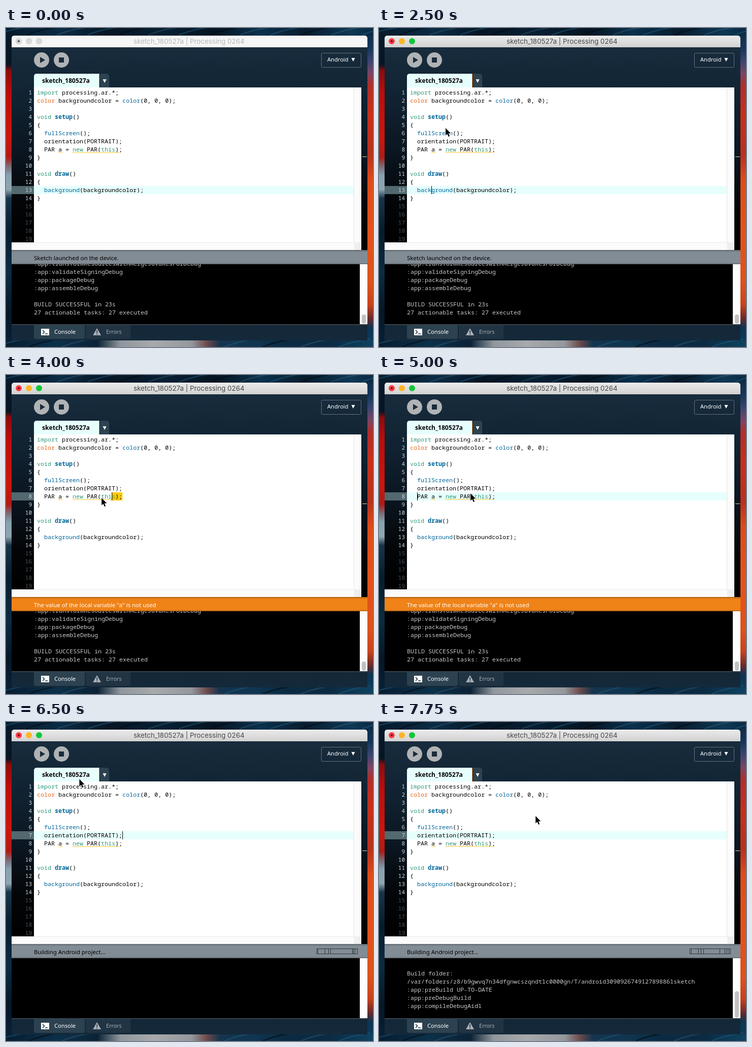
Animation, 722 px wide and 628 px high, one loop 8000 ms. Source, as an HTML page with a canvas:

```html
<!DOCTYPE html>
<html lang="en">
<head>
<meta charset="utf-8">
<title>Sketch editor</title>
<style>
html, body { margin: 0; width: 100%; height: 100%; overflow: hidden; background: #061725; }
canvas { display: block; }
</style>
</head>
<body>
<canvas id="stage" width="722" height="628"></canvas>
<script>
const ctx = document.getElementById('stage').getContext('2d');
const STEP = 250, LOOP = 8000;
const MONO = '"Noto Sans Mono", "DejaVu Sans Mono", monospace';
const SANS = '"Noto Sans", "Open Sans", sans-serif';
const COL = 7, ROW = 16, CODE_X = 61;
const GREEN = '#33997e', BLUE = '#006699', ORANGE = '#e2661a', AQUA = '#e6fffd';

// Each line is a list of [column, text, colour, bold].
const code = [
  [[0, 'import', GREEN], [7, 'processing.ar.*;']],
  [[0, 'color', ORANGE], [6, 'backgroundcolor ='], [24, 'color', BLUE], [29, '(0, 0, 0);']],
  [],
  [[0, 'void', GREEN], [5, 'setup', BLUE, true], [10, '()']],
  [[0, '{']],
  [[2, 'fullScreen', BLUE], [12, '();']],
  [[2, 'orientation(PORTRAIT);']],
  [[2, 'PAR a ='], [10, 'new', GREEN], [14, 'PAR('], [18, 'this', GREEN], [22, ');']],
  [[0, '}']],
  [],
  [[0, 'void', GREEN], [5, 'draw', BLUE, true], [9, '()']],
  [[0, '{']],
  [[2, 'background', BLUE], [12, '(backgroundcolor);']],
  [[0, '}']]
];

const oldLog = [':app:transformResourcesWithMergeJavaResForDebug', ':app:validateSigningDebug',
  ':app:packageDebug', ':app:assembleDebug', '', 'BUILD SUCCESSFUL in 23s',
  '27 actionable tasks: 27 executed'];
const newLog = ['Build folder:',
  '/var/folders/z8/b9gwvq7n34dfgnwcszqndtlc0000gn/T/android3090926749127898861sketch',
  ':app:preBuild UP-TO-DATE', ':app:preDebugBuild', ':app:compileDebugAidl'];

// Pointer stops: [time, x, y].
const route = [[1250, 112, 330], [1500, 103, 316], [2250, 103, 316], [2500, 130, 196],
  [2750, 70, 175], [3000, 150, 200], [3250, 240, 226], [3500, 280, 238], [3750, 230, 237],
  [4000, 187, 241], [4250, 75, 240], [4500, 110, 238], [5000, 179, 232], [5250, 236, 218],
  [6000, 65, 76], [6250, 65, 76], [7000, 300, 182], [7250, 307, 184]];

function pointerAt(t) {
  if (t < route[0][0]) return null;
  const i = route.findIndex(p => p[0] > t);
  if (i < 0) return route[route.length - 1].slice(1);
  const [t0, x0, y0] = route[i - 1], [t1, x1, y1] = route[i];
  const k = (t - t0) / (t1 - t0);
  return [x0 + (x1 - x0) * k, y0 + (y1 - y0) * k];
}

function rect(x, y, w, h, fill) {
  ctx.fillStyle = fill;
  ctx.fillRect(x, y, w, h);
}

function round(x, y, w, h, radii, fill) {
  ctx.beginPath();
  ctx.roundRect(x, y, w, h, radii);
  ctx.fillStyle = fill;
  ctx.fill();
}

function disc(x, y, r, fill) {
  ctx.beginPath();
  ctx.arc(x, y, r, 0, Math.PI * 2);
  ctx.fillStyle = fill;
  ctx.fill();
}

function poly(points, fill) {
  ctx.beginPath();
  points.forEach(p => ctx.lineTo(p[0], p[1]));
  ctx.closePath();
  ctx.fillStyle = fill;
  ctx.fill();
}

function text(str, x, y, fill, font, align = 'left') {
  ctx.font = font;
  ctx.textAlign = align;
  ctx.fillStyle = fill;
  ctx.fillText(str, x, y);
}

function mono(str, x, y, fill, bold) {
  text(str, x, y, fill, (bold ? 'bold ' : '') + '11.667px ' + MONO);
}

// Stops alternate position (pixels along the axis) and colour.
function ramp(x0, y0, x1, y1, ...stops) {
  const g = ctx.createLinearGradient(x0, y0, x1, y1);
  const len = Math.hypot(x1 - x0, y1 - y0);
  for (let i = 0; i < stops.length; i += 2) g.addColorStop(stops[i] / len, stops[i + 1]);
  return g;
}

// Slanted brush strokes spread evenly from (x, y).
function strokes(count, x, y, dx, dy, colors) {
  ctx.lineWidth = 2.5;
  for (let i = 0; i < count; i++) {
    ctx.strokeStyle = colors[i % colors.length];
    ctx.beginPath();
    ctx.moveTo(x + i * dx, y + i * dy + 14);
    ctx.quadraticCurveTo(x + i * dx + 22, y + i * dy + 4, x + i * dx + 62, y + i * dy - 2);
    ctx.stroke();
  }
}

function wallpaper() {
  rect(0, 0, 722, 628, '#061725');
  rect(0, 0, 11, 628, ramp(0, 0, 0, 628, 0, '#061a2b', 72, '#071522', 84, '#8d0c0c',
    130, '#bd0d0a', 215, '#cb170b', 255, '#b01b14', 272, '#7c6a76', 290, '#86a2b1',
    318, '#8fa5b0', 335, '#17354a', 400, '#071c2c', 480, '#0b2c43', 560, '#061726', 628, '#08213a'));
  rect(711, 0, 11, 628, ramp(711, 0, 711, 628, 0, '#0b2b45', 40, '#16365a', 65, '#3b4670',
    90, '#7c4564', 112, '#b02e2a', 170, '#c92f19', 250, '#b8321c', 300, '#df4c1a',
    400, '#e4521a', 500, '#de521c', 545, '#c8421c', 572, '#6a2a2a', 590, '#0c3553', 628, '#0d3d5c'));
  rect(0, 0, 722, 15, ramp(0, 0, 722, 0, 0, '#06192a', 110, '#0a2c45', 200, '#061523',
    310, '#071f33', 410, '#051421', 500, '#0a314c', 590, '#071c2e', 680, '#0d3855', 722, '#0a2a42'));
  rect(0, 615, 722, 13, ramp(0, 0, 722, 0, 0, '#071d30', 100, '#0b304a', 180, '#0b2235',
    225, '#8f979d', 290, '#a8a9ab', 365, '#94989d', 395, '#6d4a4c', 420, '#15344d',
    490, '#0f3550', 550, '#0a2a42', 640, '#0b2b43', 722, '#0e4362'));
  const blues = ['rgba(32,92,128,.5)', 'rgba(2,10,18,.6)', 'rgba(90,130,155,.25)'];
  strokes(13, -20, 0, 60, 0, blues);
  strokes(4, 430, 614, 75, 0, blues);
  strokes(3, -20, 614, 65, 0, blues);
}

function titleBar(active) {
  round(11, 15, 700, 23, [5, 5, 0, 0],
    active ? ramp(0, 15, 0, 37, 0, '#ebebeb', 22, '#d3d3d3') : '#f6f6f6');
  const lights = active ? ['#fc3b45', '#fdb525', '#12c639'] : ['#d9d9d9', '#d9d9d9', '#d9d9d9'];
  lights.forEach((c, i) => {
    disc(25 + i * 20, 26, 6, active ? c : '#c6c6c6');
    if (!active) disc(25 + i * 20, 26, 5.2, c);
  });
  disc(25, 26, 2, active ? '#6b0609' : '#4a4a4a');
  text('sketch_180527a | Processing 0264', 360, 31, active ? '#484848' : '#b7b7b7',
    '13.35px Inter, "Liberation Sans", sans-serif', 'center');
}

function arrowDown(x, y) {
  poly([[x - 3.5, y - 3], [x + 3.5, y - 3], [x, y + 4]], '#fff');
}

function toolbar(t) {
  disc(70, 63, 15, t === 6250 ? '#fff' : '#b0b3b5');
  poly([[67, 57], [67, 69], [77, 63]], '#1a2b39');
  disc(109, 63, 15, '#b0b3b5');
  rect(104, 58, 10, 10, '#1a2b39');
  if (t >= 5750 && t <= 6250) text('Run on device', 133, 67, '#f2f5f6', '10.9px ' + SANS);

  ctx.strokeStyle = '#62717d';
  ctx.lineWidth = 1;
  ctx.beginPath();
  ctx.roundRect(620.5, 49.5, 78, 28, 2);
  ctx.stroke();
  text('Android', 632, 66, '#fff', '11.1px ' + SANS);
  arrowDown(683, 62);

  round(55, 90, 128, 27, [5, 0, 0, 0], AQUA);
  rect(183, 90, 1, 27, '#d8701f');
  text('sketch_180527a', 71, 108, '#000', 'bold 12.1px ' + SANS);
  round(185, 90, 18, 27, [0, 5, 0, 0], '#2d4250');
  arrowDown(194, 104);
}

function squiggle(x0, x1, y) {
  for (let x = x0; x < x1; x += 2) rect(x, y + (x - x0) / 2 % 2, 2, 1, '#ffc21a');
}

function caretState(t) {
  const blink = since => t >= since && (t - since) % 1000 < 500;
  if (t < 3750) return { line: 13, col: 6, on: blink(1500) };
  if (t < 4250) return { line: 8, col: t < 4000 ? 24 : 21, on: true, drag: t >= 4000 };
  if (t < 5250) return { line: 8, col: 2, on: true, drag: t < 5000 };
  return { line: 7, col: 24, on: blink(5250) };
}

function editor(t) {
  rect(11, 117, 44, 305, ramp(0, 117, 0, 422, 0, '#122535', 120, '#0b1722', 230, '#030507', 305, '#000'));
  rect(55, 117, 644, 305, '#fff');
  const caret = caretState(t);
  const top = 119 + (caret.line - 1) * ROW - 8 + 8;
  rect(11, top, 44, ROW, '#52696f');
  if (!caret.drag) rect(55, top, 630, ROW, AQUA);
  else rect(CODE_X + caret.col * COL, top, (24 - caret.col) * COL, ROW, '#ffcc00');

  for (let n = 1; n <= 19; n++) {
    text(n, 51, 131 + (n - 1) * ROW, n > 14 ? '#4c5359' : '#cbd5d9', '11px ' + MONO, 'right');
  }
  code.forEach((line, i) => line.forEach(([col, str, fill, bold]) =>
    mono(str, CODE_X + col * COL, 131 + i * ROW, fill || '#000', bold)));
  squiggle(103, 111, 244);
  squiggle(131, 223, 244);
  if (caret.on) rect(CODE_X + caret.col * COL, top, 1, ROW, '#000');

  rect(685, 117, 14, 305, '#fbfbfb');
  rect(684, 117, 1, 305, '#e6e6e6');
  rect(11, 422, 688, 15, '#fbfbfb');
  rect(55, 422, 644, 1, '#e8e8e8');
  rect(685, 422, 14, 15, '#efefef');
  rect(699, 117, 12, 320, ramp(0, 117, 0, 437, 0, '#122535', 120, '#0b1722', 240, '#030507', 320, '#000'));
  rect(701, 253, 9, 1, '#f0d9b0');
}

function progress(t) {
  ctx.strokeStyle = '#30373c';
  ctx.lineWidth = 1;
  ctx.strokeRect(611.5, 446.5, 80, 10);
  const marks = t >= 7750 ? [3, 17, 22, 27, 59, 69, 73, 77] : [11, 13, 16, 23, 37, 44, 48];
  const shift = t >= 7750 ? 0 : (t - 7250) / STEP * 7;
  marks.forEach(m => rect(611 + ((m + shift) % 80 + 80) % 80, 447, 1, 9, '#30373c'));
}

function status(t) {
  const warn = t >= 4000 && t < 5250;
  rect(11, 437, 700, 28, warn ? '#ef8318' : '#828c94');
  rect(11, 437, 700, 4, ramp(0, 437, 0, 441, 0, 'rgba(0,0,0,.28)', 4, 'rgba(0,0,0,0)'));
  rect(11, 462, 700, 3, ramp(0, 462, 0, 465, 0, 'rgba(0,0,0,0)', 3, 'rgba(0,0,0,.25)'));
  let msg = 'Sketch launched on the device.';
  if (warn) msg = 'The value of the local variable "a" is not used';
  else if (t >= 6500) msg = 'Building Android project...';
  else if (t >= 5250) msg = '';
  text(msg, 55, 457, warn ? '#fff' : '#000', '11.5px ' + SANS);
  if (t >= 6500) progress(t);
}

function consolePane(t) {
  rect(11, 465, 685, 118, '#000');
  rect(696, 465, 15, 118, '#fdfdfd');
  let lines = oldLog, base = 564, thumb = 564;
  if (t >= 6500) {
    const count = t < 7250 ? 0 : t < 7500 ? 2 : t < 7750 ? 3 : 5;
    lines = newLog.slice(0, count);
    base = 563;
    thumb = count && 508 + count * 4.4;
  }
  ctx.save();
  ctx.beginPath();
  ctx.rect(11, 465, 685, 118);
  ctx.clip();
  lines.forEach((s, i) => mono(s, 55, base - (lines.length - 1 - i) * ROW, '#cacaca'));
  ctx.restore();
  if (thumb) round(700, thumb, 8, 582 - thumb, 4, '#c1c1c1');
}

function footer() {
  rect(11, 583, 700, 32, ramp(0, 583, 0, 615, 0, '#132737', 32, '#14293a'));
  rect(11, 583, 700, 2, '#35434e');
  round(55, 585, 100, 27, [0, 0, 4, 4], '#2d4250');
  round(157, 585, 88, 27, [0, 0, 4, 4], '#213444');
  rect(69, 592, 16, 13, '#fff');
  ctx.strokeStyle = '#20323f';
  ctx.lineWidth = 1.6;
  ctx.beginPath();
  ctx.moveTo(72, 595);
  ctx.lineTo(75.5, 598.5);
  ctx.lineTo(72, 602);
  ctx.moveTo(77, 602);
  ctx.lineTo(82, 602);
  ctx.stroke();
  text('Console', 95, 602, '#fff', '500 11.2px ' + SANS);
  poly([[179, 591], [187, 605], [171, 605]], '#a9b0b5');
  rect(178.2, 595.5, 1.7, 5, '#213444');
  rect(178.2, 601.8, 1.7, 1.7, '#213444');
  text('Errors', 197, 602, '#a9b2b8', '10.6px ' + SANS);
}

function pointer(t) {
  const p = pointerAt(t);
  if (!p) return;
  ctx.save();
  ctx.translate(p[0], p[1]);
  ctx.lineJoin = 'round';
  poly([[1, 1], [1, 15.5], [4.3, 12.4], [6.7, 18], [9, 17], [6.6, 11.6], [11.2, 11.4]], '#000');
  ctx.strokeStyle = '#fff';
  ctx.lineWidth = 2;
  ctx.stroke();
  ctx.fill();
  ctx.restore();
}

function draw(t) {
  wallpaper();
  rect(11, 37, 700, 578, ramp(0, 37, 0, 615, 0, '#182c3d', 80, '#122535', 578, '#122535'));
  titleBar(t >= 1500);
  toolbar(t);
  editor(t);
  status(t);
  consolePane(t);
  footer();
  pointer(t);
}

const start = performance.now();
let last = -1;
function tick() {
  const t = Math.floor((performance.now() - start) % LOOP / STEP) * STEP;
  if (t !== last) draw(last = t);
  requestAnimationFrame(tick);
}
tick();
</script>
</body>
</html>
```
